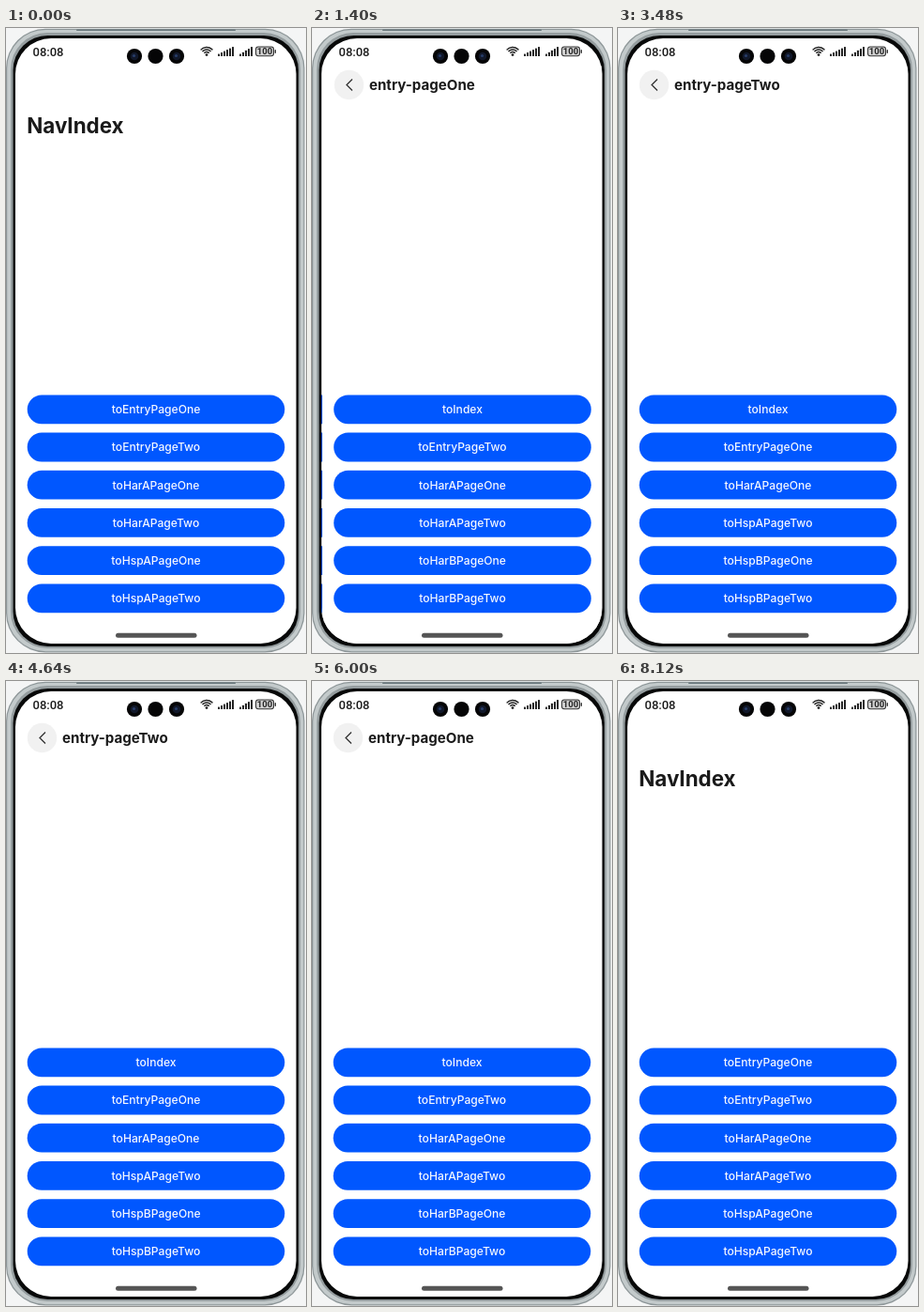
Animation, 320 px wide and 665 px high, one loop 8.28 s. Source, as an HTML page with a canvas:

```html
<!DOCTYPE html>
<html lang="en">
<head>
<meta charset="utf-8">
<title>Page navigation</title>
<style>
  html, body { margin: 0; width: 100%; height: 100%; overflow: hidden; background: #f4f5f5; }
  canvas { display: block; }
</style>
</head>
<body>
<canvas id="stage" width="320" height="665"></canvas>
<script>
const ctx = document.getElementById('stage').getContext('2d');
const LOOP = 8280, LEFT = 10, RIGHT = 309.5, TOP = 40, WIDTH = RIGHT - LEFT;
const PARALLAX = 55;
const SPRING_RATE = Math.sqrt(342), SLIDE_TIME = 640;

const index = {
  title: 'NavIndex', root: true,
  items: ['EntryPageOne', 'EntryPageTwo', 'HarAPageOne', 'HarAPageTwo', 'HspAPageOne', 'HspAPageTwo']
};
const pageOne = {
  title: 'entry-pageOne',
  items: ['Index', 'EntryPageTwo', 'HarAPageOne', 'HarAPageTwo', 'HarBPageOne', 'HarBPageTwo']
};
const pageTwo = {
  title: 'entry-pageTwo',
  items: ['Index', 'EntryPageOne', 'HarAPageOne', 'HspAPageTwo', 'HspBPageOne', 'HspBPageTwo']
};

const slides = [
  { start: 973, under: index, over: pageOne, push: true },
  { start: 2658, under: pageOne, over: pageTwo, push: true },
  { start: 4684, under: pageOne, over: pageTwo },
  { start: 6155, under: index, over: pageOne }
];

function pill(x, y, w, h, r, color) {
  ctx.fillStyle = color;
  ctx.beginPath();
  ctx.roundRect(x, y, w, h, r);
  ctx.fill();
}

function disc(x, y, r, color) {
  pill(x - r, y - r, 2 * r, 2 * r, r, color);
}

function line(points, color, width) {
  ctx.strokeStyle = color;
  ctx.lineWidth = width;
  ctx.beginPath();
  points.forEach(([x, y]) => ctx.lineTo(x, y));
  ctx.stroke();
}

function text(value, x, y, font, color, align = 'left') {
  ctx.font = font;
  ctx.fillStyle = color;
  ctx.textAlign = align;
  ctx.fillText(value, x, y);
}

function drawPage(page, titleShift, buttonShift, iconAlpha = 1) {
  if (page.root) {
    text(page.title, 22.2 + titleShift, 112, '700 22.4px Inter, sans-serif', '#1a1a1a');
  } else {
    ctx.globalAlpha = iconAlpha;
    disc(38.5 + titleShift, 60.5, 15.7, '#f1f1f1');
    line([[42, 54.5], [36, 60.5], [42, 66.5]].map(([x, y]) => [x + titleShift, y]), '#333', 1.3);
    ctx.globalAlpha = 1;
    text(page.title, 60 + titleShift, 66, '700 15.1px Inter, sans-serif', '#1a1a1a');
  }
  page.items.forEach((item, i) => {
    const y = 390.4 + i * 40.2;
    pill(22.7 + buttonShift, y, 274.6, 30.8, 15.4, '#0057ff');
    text('to' + item, 160 + buttonShift, y + 19.7, '500 12.1px Inter, sans-serif', '#f4f7ff', 'center');
  });
}

function drawSlide(slide, time) {
  // Critically damped spring: the share of the way still to go.
  const phase = SPRING_RATE * (time - slide.start) / 1000;
  const rest = (1 + phase) * Math.exp(-phase);
  const cover = slide.push ? 1 - rest : rest;
  const offset = WIDTH * (1 - cover);

  drawPage(slide.under, -PARALLAX * cover, -PARALLAX * cover);
  ctx.fillStyle = `rgba(0, 0, 0, ${0.11 * cover})`;
  ctx.fillRect(LEFT, TOP, WIDTH, 620);

  // The upper page narrows to the visible width, so its buttons stay centred there.
  ctx.save();
  ctx.beginPath();
  ctx.rect(LEFT + offset, TOP, WIDTH - offset, 620);
  ctx.clip();
  ctx.fillStyle = '#fff';
  ctx.fillRect(LEFT, TOP, WIDTH, 620);
  const iconAlpha = Math.min(1, Math.max(0, (cover - 0.82) / 0.14));
  drawPage(slide.over, offset, offset / 2, iconAlpha);
  ctx.restore();
}

function drawFrame() {
  ctx.fillStyle = '#f4f5f5';
  ctx.fillRect(0, 0, 320, 665);
  pill(0, 0.8, 318.5, 663.6, 42, '#8d9698');
  pill(1.2, 2, 316.1, 661.2, 41, '#c3cacb');
  pill(5, 5, 309, 655, 39, '#959d9f');
  pill(7.5, 8, 304.5, 650, 37, '#080909');
  pill(75, 1.5, 170, 1.6, 0.8, '#68777c');
}

function drawBars(x, count) {
  for (let i = 0; i < count; i++) {
    const h = 2.5 + i * 7.5 / (count - 1);
    pill(x + i * 3, 30 - h, 2, h, 0.6, '#222');
  }
}

function drawStatus() {
  text('08:08', 28.5, 29.5, '500 13px Roboto, sans-serif', '#1c1c1c');

  [137, 159.5, 182].forEach(x => disc(x, 30, 8.1, '#050506'));
  [137, 182].forEach(x => {
    disc(x, 30, 4.3, '#11182a');
    disc(x - 0.5, 29.5, 1.6, '#273d68');
  });

  ctx.strokeStyle = '#222';
  ctx.lineWidth = 1.5;
  [3.5, 6, 8.5].forEach(r => {
    ctx.beginPath();
    ctx.arc(214, 29, r, -Math.PI * 0.77, -Math.PI * 0.23);
    ctx.stroke();
  });
  disc(214, 28.6, 1.4, '#222');

  drawBars(226, 6);
  drawBars(249, 5);

  pill(266, 19.5, 20, 10.8, 3, '#333');
  pill(267, 20.5, 18, 8.8, 2.2, '#d2d2d2');
  pill(286.6, 23, 1.4, 4, 0.7, '#333');
  text('100', 276, 28.4, '700 9.5px Roboto, sans-serif', '#222', 'center');
}

function render(now) {
  const time = now % LOOP;
  drawFrame();
  ctx.save();
  ctx.beginPath();
  ctx.roundRect(LEFT, 11, WIDTH, 644, 38);
  ctx.fillStyle = '#fff';
  ctx.fill();
  ctx.clip();

  const slide = slides.filter(s => time >= s.start).pop();
  if (slide && time < slide.start + SLIDE_TIME) {
    drawSlide(slide, time);
  } else {
    drawPage(slide ? (slide.push ? slide.over : slide.under) : index, 0, 0);
  }
  drawStatus();
  pill(117, 643.8, 86.5, 5, 2.5, '#555');
  ctx.restore();
  requestAnimationFrame(render);
}
requestAnimationFrame(render);
</script>
</body>
</html>
```
